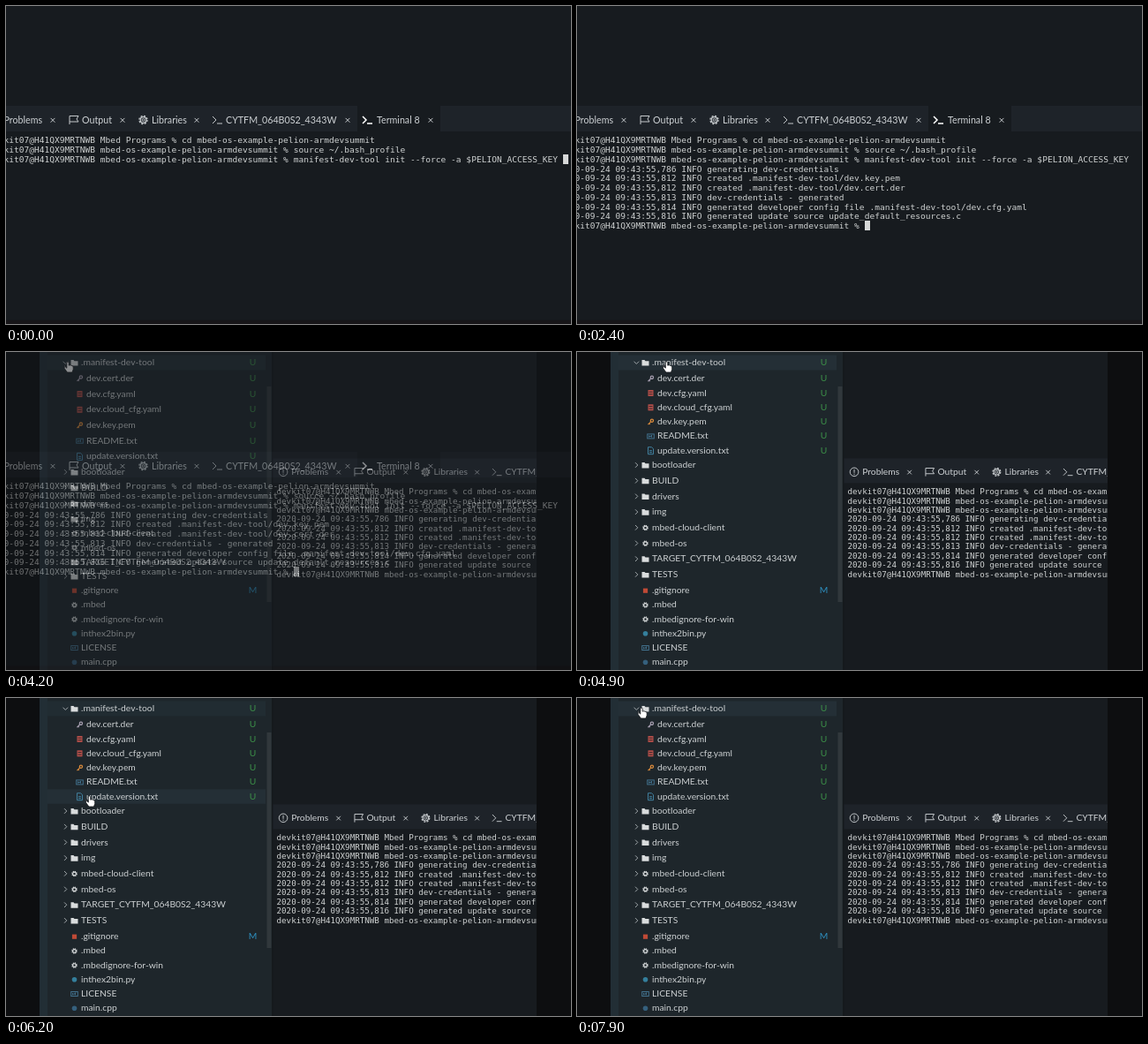
These frames come from a looping animation (640x360 px, 8 s). An HTML page:

```html
<!DOCTYPE html>
<html lang="en">
<head>
<meta charset="utf-8">
<title>Terminal and file tree</title>
<style>
html, body { margin: 0; width: 100%; height: 100%; overflow: hidden; background: #171b1f; }
svg { display: block; width: 640px; height: 360px; }
text { white-space: pre; }
.mono { font: 9.573px "DejaVu Sans Mono", monospace; fill: #cfd2d2; }
.tab { font: 10.7px Lato, sans-serif; fill: #cdd1d4; }
.row { font: 10.3px Lato, sans-serif; fill: #ccd0d2; }
.line { fill: none; stroke: #c4c8cb; stroke-width: 1; }
</style>
</head>
<body>
<svg id="stage" viewBox="0 0 640 360"></svg>
<script>
const FADE = [3700, 4700], OUTPUT_AT = 1100, SETTLE_AT = 4500, LOOP = 8000;
const $ = id => document.getElementById(id);
const rect = (x, y, w, h, fill, more = '') =>
  `<rect x="${x}" y="${y}" width="${w}" height="${h}" fill="${fill}" ${more}/>`;
const line = (d, more = '') => `<path class="line" d="${d}" ${more}/>`;
const text = (cls, x, y, s, more = '') => `<text class="${cls}" x="${x}" y="${y}" ${more}>${s}</text>`;
const at = (x, y, body) => `<g transform="translate(${x} ${y})">${body}</g>`;

// Terminal
const host = 'devkit07@H41QX9MRTNWB ';
const prompt = host + 'mbed-os-example-pelion-armdevsummit % ';
const log = (ms, s) => `2020-09-24 09:43:55,${ms} INFO ${s}`;
const typed = [
  host + 'Mbed Programs % cd mbed-os-example-pelion-armdevsummit',
  prompt + 'source ~/.bash_profile',
  prompt + 'manifest-dev-tool init --force -a $PELION_ACCESS_KEY'
];
const output = [
  log(786, 'generating dev-credentials'),
  log(812, 'created .manifest-dev-tool/dev.key.pem'),
  log(812, 'created .manifest-dev-tool/dev.cert.der'),
  log(813, 'dev-credentials - generated'),
  log(814, 'generated developer config file .manifest-dev-tool/dev.cfg.yaml'),
  log(816, 'generated update source update_default_resources.c'),
  prompt
];
const printLines = (lines, first) =>
  lines.map((s, i) => text('mono', -19.8, 155.4 + 10.76 * (first + i), s)).join('');

const gear = (r, color) =>
  `<circle r="${r}" fill="none" stroke="${color}" stroke-width="1.3" stroke-dasharray="${r * .45} ${r * .335}"/>` +
  `<circle r="${r * .72}" fill="none" stroke="${color}" stroke-width="1.2"/>`;
const shell = 'M-5-4l4 4-4 4M0 4h6';
const tabs = [
  ['Problems', -2.5, -12, 53, '<circle class="line" r="5"/>' + line('M0-3V1M0 2v1.3')],
  ['Output', 86, 77, 132, line('M-5 5V-4.5H5l-2 3.5 2 3H-5')],
  ['Libraries', 165, 155.5, 216, gear(4.6, '#c4c8cb') + '<circle class="line" r="1.4"/>'],
  ['CYTFM_064B0S2_4343W', 249, 239, 387, line(shell)],
  ['Terminal 8', 420, 409, 481, line(shell, 'style="stroke:#fff;stroke-width:1.5"')]
];

function terminal(outputId, cursorId) {
  return rect(-40, -20, 720, 420, '#171b1f') +
    rect(-40, 113, 720, 29, '#1e2329') + rect(398, 113, 94, 29, '#171b1f') +
    tabs.map(([name, x, iconX, closeX, icon]) =>
      at(iconX, 129, icon) + text('tab', x, 132.8, name) +
      at(closeX, 129.3, line('M-2.4-2.4l4.8 4.8M2.4-2.4l-4.8 4.8'))).join('') +
    printLines(typed, 0) +
    `<g id="${outputId}">${printLines(output, 3)}</g>` +
    rect(631, 168, 6, 11, '#d6d8d8', `id="${cursorId}"`);
}

// File tree
const folderIcon = '<path fill="#d9dcdd" d="M-4-3.2h3l1 1.2h4V3.4h-8z"/>';
const key = c => `<g fill="none" stroke="${c}" stroke-width="1.3"><circle cx="1.4" cy="-1.4" r="1.6"/><path d="M.2-.2L-3 3M-1.8 1.8l1 1"/></g>`;
const page = c => `<path d="M-3-4h4l2 2V4h-6zM-1.5 0h3M-1.5 2h3" fill="none" stroke="${c}"/>`;
const card = rect(-3.8, -2.5, 7.6, 5, 'none', 'stroke="#41708c"') +
  line('M-2 1.2v-2l1.5 1.5L1-1.3v2.5', 'style="stroke:#41708c"');
const yaml = rect(-3, -3.5, 6, 7, '#b54f4a') + line('M-2-1.3h4M-2 1.3h4', 'style="stroke:#3a2a2c"');
const dot = c => `<circle r="2.8" fill="${c}"/>`;
const cog = gear(2.6, '#d9dcdd');
// name, icon, level (0 folder, 1 nested file, 2 plain file)
const files = [
  ['.manifest-dev-tool', folderIcon, 0],
  ['dev.cert.der', key('#a49cae'), 1], ['dev.cfg.yaml', yaml, 1], ['dev.cloud_cfg.yaml', yaml, 1],
  ['dev.key.pem', key('#d98a3c'), 1],
  ['README.txt', card, 1], ['update.version.txt', page('#41809f'), 1],
  ['bootloader', folderIcon, 0], ['BUILD', folderIcon, 0], ['drivers', folderIcon, 0], ['img', folderIcon, 0],
  ['mbed-cloud-client', cog, 0], ['mbed-os', cog, 0],
  ['TARGET_CYTFM_064B0S2_4343W', folderIcon, 0], ['TESTS', folderIcon, 0],
  ['.gitignore', rect(-2.6, -2.6, 5.2, 5.2, '#c04a36'), 2],
  ['.mbed', cog, 2], ['.mbedignore-for-win', cog, 2],
  ['inthex2bin.py', dot('#347f9c'), 2], ['LICENSE', card, 2], ['main.cpp', dot('#35607d'), 2]
];
const earlyY = n => n < 11 ? 12 + 17.7 * n : 189 + 16.2 * (n - 10);
const settledY = n => !n ? 12 : n < 7 ? 13.7 + 16.3 * n : n < 15 ? 128 + 17.7 * (n - 7) : 270 + 16.2 * (n - 15);

function treeRow([name, icon, level], n) {
  const x = level === 1 ? 91 : 85;
  const mark = n < 7 ? 'U' : name === '.gitignore' ? 'M' : '';
  const arrow = level ? '' :
    at(67.3, 0, line(n ? 'M-1.3-2.8l2.8 2.8-2.8 2.8' : 'M-2.8-1.3l2.8 2.8 2.8-2.8', 'style="stroke:#a0a6aa"'));
  return `<g class="item">${arrow}${at(x - 7.5, .2, icon)}${text('row', x, 3.2, name)}` +
    text('row', 279.5, 3.2, mark, `text-anchor="middle" style="fill:${mark === 'U' ? '#3c8f48' : '#2d8fc0'}"`) + '</g>';
}

const hand = '<path id="hand" fill="#fff" stroke="#16191c" stroke-width=".8" stroke-linejoin="round" ' +
  'd="M-1.2.8Q0-.8 1.2.8V4.2L2.8 3.8 4.6 4.5 6.2 5.4V8.6L5 12H-.6L-3.8 7.6Q-4-0 -2.6 6L-1.2 7.2z"/>';

$('stage').innerHTML =
  terminal('outA', 'cursorA') + rect(0, 355.5, 640, 5, '#171518') +
  '<g id="second">' +
    `<g transform="translate(325.6 11.6) scale(.963)">${terminal('outB', 'cursorB')}</g>` +
    rect(38, 0, 264, 360, '#1e262b') + rect(38, 0, 9, 360, '#222e35') +
    rect(47, 3.5, 247, 17, '#212c32') + rect(47, 0, 247, 16.5, '#242f36', 'id="hover"') +
    rect(295.5, 39, 5, 244, '#31383c') + rect(301, 0, 1.5, 360, '#15191c') +
    files.map(treeRow).join('') +
    rect(0, 0, 38, 360, '#0d0e10') + rect(601, 0, 39, 360, '#0d0e10') +
    hand +
  '</g>';

// Pointer stops: time, x, y
const stops = [[0, 70, 11], [4400, 70, 11], [4900, 101.5, 11], [5300, 101.5, 11],
  [6000, 94.5, 111], [6600, 94.5, 111], [7300, 73, 11], [LOOP, 73, 11]];
const clamp = v => Math.max(0, Math.min(1, v));
function pointer(t) {
  const i = stops.findIndex(s => s[0] > t);
  const a = stops[i - 1], b = stops[i];
  const u = (t - a[0]) / (b[0] - a[0]), e = u * u * (3 - 2 * u);
  return [a[1] + (b[1] - a[1]) * e, a[2] + (b[2] - a[2]) * e];
}

const items = [...document.querySelectorAll('.item')];
function draw(now) {
  const t = now % LOOP, done = t >= OUTPUT_AT;
  $('outA').style.display = done ? '' : 'none';
  $('cursorA').setAttribute('x', done ? 326 : 631);
  $('cursorA').setAttribute('y', done ? 243 : 168);
  $('second').setAttribute('opacity', clamp((t - FADE[0]) / (FADE[1] - FADE[0])));

  const rowY = t < SETTLE_AT ? earlyY : settledY;
  items.forEach((el, n) => el.setAttribute('transform', `translate(0 ${rowY(n)})`));

  const [x, y] = pointer(t);
  $('hand').setAttribute('transform', `translate(${x} ${y})`);
  const distance = n => Math.abs(rowY(n) - y - 1);
  const over = files.reduce((best, _, n) => distance(n) < distance(best) ? n : best, 0);
  $('hover').setAttribute('y', rowY(over) - 8.2);
}
function tick() {
  draw(performance.now());
  requestAnimationFrame(tick);
}
tick();
</script>
</body>
</html>
```
